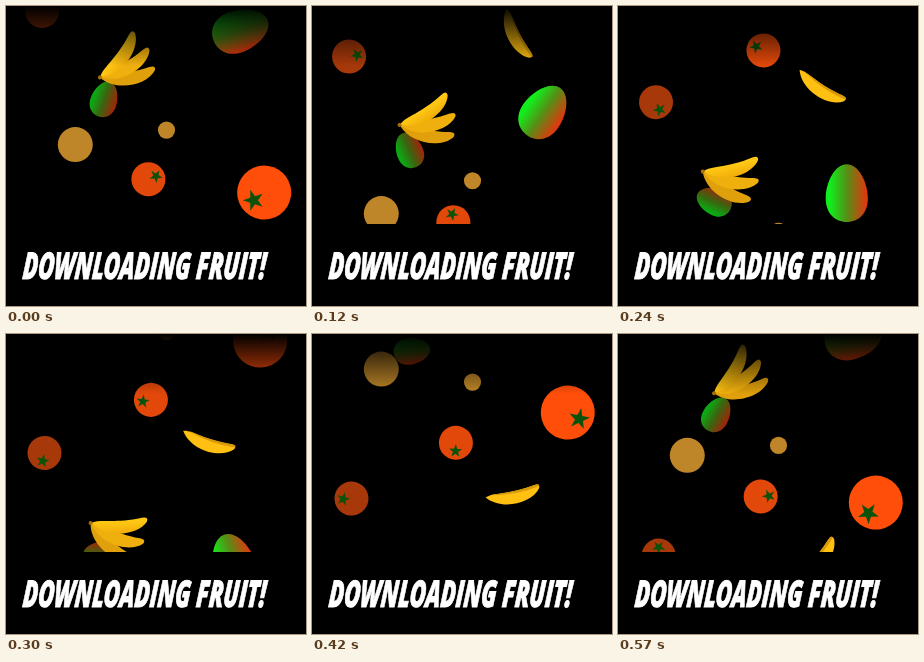
These frames come from a looping animation (300 by 300 pixels, 600 ms). An HTML page:

```html
<!DOCTYPE html>
<html lang="en">
<head>
<meta charset="utf-8">
<title>Downloading fruit</title>
<style>
html, body { margin: 0; width: 100%; height: 100%; overflow: hidden; background: #000; }
svg { display: block; width: 100vw; height: 100vh; }
text { font: italic 900 37px "Open Sans", "Noto Sans", sans-serif; font-stretch: 62.5%; fill: #fff; stroke: #fff; }
</style>
</head>
<body>
<svg viewBox="0 0 300 300">
  <defs>
    <clipPath id="window"><rect width="300" height="218"/></clipPath>
    <linearGradient id="fade" x2="0" y2="1">
      <stop/><stop offset="1" stop-opacity="0"/>
    </linearGradient>
    <linearGradient id="skin" x2="0" y2="1">
      <stop offset=".1" stop-color="#12ee1c"/>
      <stop offset=".5" stop-color="#549016"/>
      <stop offset=".95" stop-color="#dc3a0e"/>
    </linearGradient>
    <linearGradient id="peel" x2="0" y2="1">
      <stop offset=".2" stop-color="#ffc814"/><stop offset="1" stop-color="#f0ac0a"/>
    </linearGradient>
    <path id="star" fill="#0b520b"/>
    <g id="orange"><circle r="27"/><use href="#star" x="13"/></g>
    <path id="mango" fill="url(#skin)" d="M30 0C30 12 12 21.5 -5 21.5C-20 21.5 -29 12 -29 0C-29 -12 -20 -21.5 -5 -21.5C12 -21.5 30 -12 30 0Z"/>
    <path id="body" d="M-28 -1C-20 -5 -4 1 23 -4Q30 -5 28 0C18 14 -14 16 -28 -1Z"/>
    <g id="banana">
      <use href="#body" fill="#ffc012"/>
      <path fill="#d99a08" d="M-24 -2.5C-16 -3 -4 0 23 -4Q30 -5 28 -2Q4 3 -24 -2.5Z"/>
    </g>
    <g id="bunch" transform="translate(-28 -10)">
      <use href="#body" fill="#e0a00c" transform="rotate(44) translate(28 1)"/>
      <use href="#body" fill="#efb00e" transform="rotate(23) translate(29 1)"/>
      <use href="#body" fill="url(#peel)" transform="translate(29 1)"/>
      <circle r="2" fill="#a87008"/>
    </g>
    <circle id="ball" r="17.5" fill="#be8628"/>
  </defs>
  <g clip-path="url(#window)">
    <g id="fruit"></g>
    <rect width="300" height="60" fill="url(#fade)"/>
  </g>
  <text transform="translate(16 273) skewX(-5) scale(.6 1)">DOWNLOADING FRUIT!</text>
</svg>
<script>
const LOOP = 600, STEP = 30, EXIT = 232;
const layer = document.getElementById('fruit');

const starPoints = Array.from({ length: 10 }, (_, i) => {
  const a = Math.PI * (1 + i / 5), r = i % 2 ? 4.3 : 11;
  return `${(r * Math.cos(a)).toFixed(2)} ${(r * Math.sin(a)).toFixed(2)}`;
});
document.getElementById('star').setAttribute('d', `M${starPoints.join('L')}Z`);

// at: time when the centre crosses the top edge; speeds are per millisecond
const fruits = [
  { shape: 'ball', size: .49, at: 306, x: 160.5, drift: 0, fall: .422, angle: 0, spin: 0 },
  { shape: 'orange', size: .63, fill: '#a6380a', at: -13, x: 36, drift: .008, fall: .38, angle: -92, spin: .62 },
  { shape: 'mango', size: .62, dim: .7, at: 380, x: 100, drift: -.008, fall: .425, angle: 6, spin: -.35 },
  { shape: 'ball', size: 1, at: 359, x: 69.3, drift: 0, fall: .575, angle: 0, spin: 0 },
  { shape: 'orange', size: .63, fill: '#e2480a', at: 116, x: 146.5, drift: -.0085, fall: .358, angle: 287, spin: -.64 },
  { shape: 'banana', size: .97, at: 658, x: 206.5, drift: -.0165, fall: .44, angle: 79.5, spin: -.25 },
  { shape: 'bunch', size: .99, at: 483, x: 121, drift: -.02, fall: .474, angle: -72, spin: .167 },
  { shape: 'mango', size: .98, at: 564, x: 235, drift: -.0225, fall: .68, angle: -10, spin: -.29 },
  { shape: 'orange', size: 1, fill: '#ff4e0a', at: 289, x: 254, drift: .0135, fall: .6, angle: -55, spin: .64 }
];

function makeNode({ shape, fill, dim = 1 }) {
  const node = document.createElementNS('http://www.w3.org/2000/svg', 'use');
  node.setAttribute('href', '#' + shape);
  node.setAttribute('opacity', dim);
  if (fill) node.setAttribute('fill', fill);
  return layer.appendChild(node);
}
for (const f of fruits) f.node = makeNode(f);

const mod = (a, n) => ((a % n) + n) % n;

// Each fruit restarts one loop higher as soon as it reaches EXIT
function draw(time) {
  for (const f of fruits) {
    const lastAge = EXIT / f.fall;
    const age = mod(time - f.at - lastAge, LOOP) + lastAge - LOOP;
    f.node.setAttribute('transform',
      `translate(${f.x + f.drift * age} ${f.fall * age}) rotate(${f.angle + f.spin * age}) scale(${f.size})`);
  }
}

const start = performance.now();
function tick() {
  const time = (performance.now() - start) % LOOP;
  draw(Math.floor(time / STEP) * STEP);
  requestAnimationFrame(tick);
}
tick();
</script>
</body>
</html>
```
